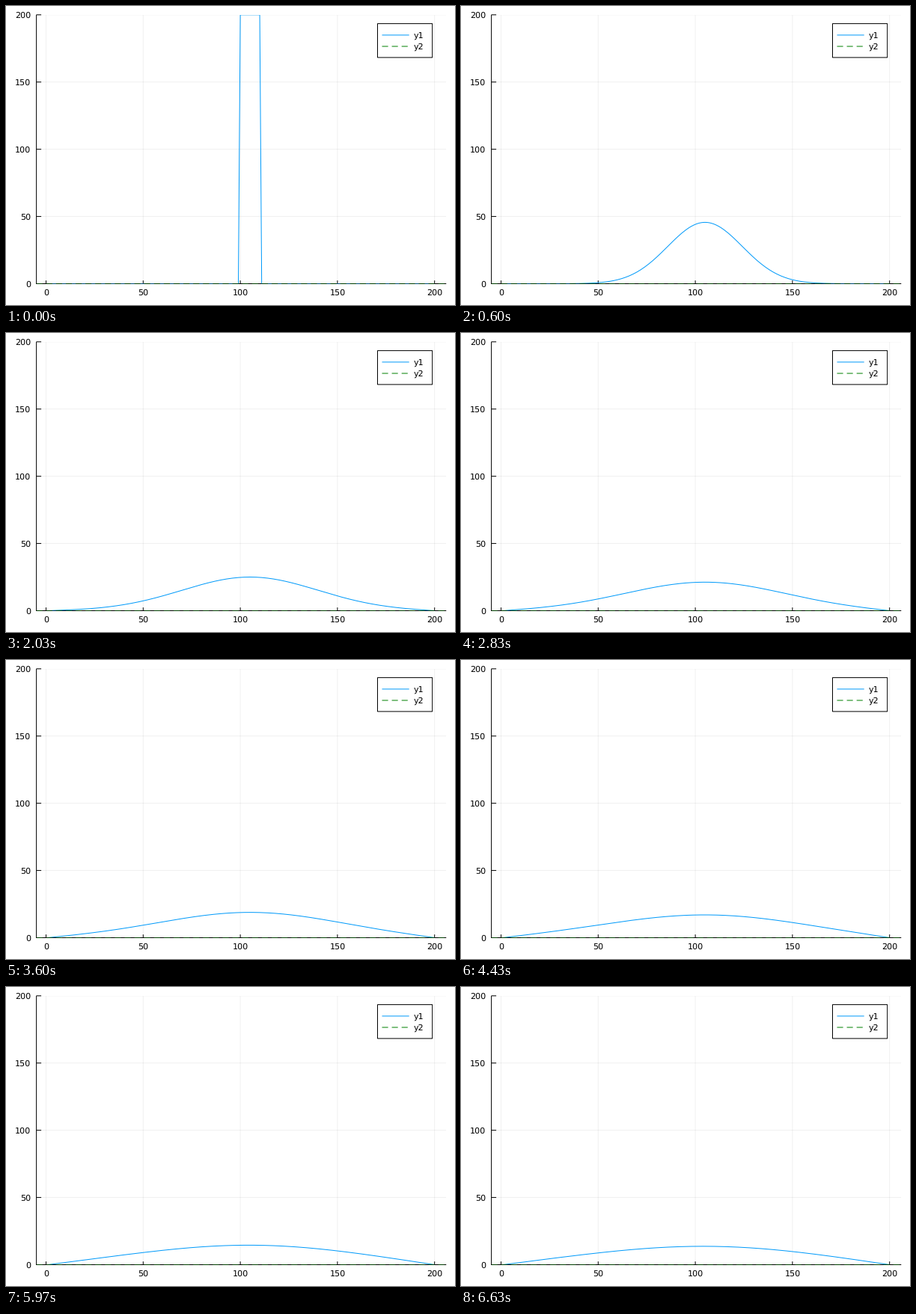
These frames come from a looping animation (600x400 px, 6660 ms). A matplotlib script:

```python
import numpy as np
import matplotlib.pyplot as plt
from matplotlib.animation import FuncAnimation
from matplotlib.patches import Rectangle

W, H, DPI = 600, 400, 100
PX = 72 / DPI                       # one pixel in points
LEFT, RIGHT, TOP, BOTTOM = 40.6, 588.2, 11.8, 371.5
BLUE, GREEN = "#009AFA", "green"
DASH = (0, (8.1, 5))
TICK_MS, LOOP_MS, STEPS = 10, 6660, 200
N, RATE = 200, 10.0                 # cells, diffusion per step

plt.rcParams.update({"font.family": "DejaVu Sans", "font.size": 8,
                     "text.hinting": "none"})

# Heat equation with ends held at zero, solved by sine modes
cell = np.arange(1, N + 1)
start = np.where((cell >= 100) & (cell <= 110), 200.0, 0.0)
mode = np.arange(1, N - 1)
basis = np.sin(np.pi * np.outer(cell - 1, mode) / (N - 1))
coef = 2 / (N - 1) * basis.T @ start
decay = 4 * RATE * np.sin(np.pi * mode / (2 * (N - 1))) ** 2


def heat(step):
    return basis @ (coef * np.exp(-decay * step))


def to_x(v):
    pad = 0.03 * (N - 1)
    return LEFT + (v - 1 + pad) * (RIGHT - LEFT) / (N - 1 + 2 * pad)


def to_y(v):
    return BOTTOM - v * (BOTTOM - TOP) / 200


# The whole stage in pixels, y downwards
fig = plt.figure(figsize=(W / DPI, H / DPI), dpi=DPI, facecolor="white")
ax = fig.add_axes([0, 0, 1, 1])
ax.set_xlim(0, W)
ax.set_ylim(H, 0)
ax.axis("off")
inside = Rectangle((LEFT, BOTTOM + 0.5), RIGHT - LEFT, TOP - BOTTOM - 0.5,
                   transform=ax.transData)


def line(xs, ys, color="black", clip=False, **style):
    artist, = ax.plot(xs, ys, color=color, linewidth=PX, snap=False,
                      solid_capstyle="butt", dash_capstyle="butt", **style)
    if clip:
        artist.set_clip_path(inside)
    return artist


for v in range(0, 201, 50):
    x, y = to_x(v), to_y(v)
    line([x, x], [TOP, BOTTOM], alpha=0.06, clip=True, zorder=1)
    line([LEFT, RIGHT], [y, y], alpha=0.06, clip=True, zorder=1)
    line([x, x], [BOTTOM, BOTTOM - 4.3])
    line([LEFT, LEFT + 6.5], [y, y])
    ax.text(x, 387, v, ha="center", va="baseline")
    ax.text(33.2, y + 4.1, v, ha="right", va="baseline")

line([LEFT, LEFT], [TOP, BOTTOM + 0.5])
line([LEFT, RIGHT], [BOTTOM, BOTTOM])
curve = line(to_x(cell), to_y(start), BLUE, clip=True, zorder=3)
line([LEFT, RIGHT], [BOTTOM, BOTTOM], GREEN, clip=True, linestyle=DASH, zorder=3)
# series lying on the axis only tint it
line([LEFT, RIGHT], [BOTTOM, BOTTOM], alpha=0.5, zorder=4)

ax.add_patch(Rectangle((496.5, 23.6), 73.2, 45.3, facecolor="white",
                       edgecolor="black", linewidth=PX, snap=False, zorder=5))
for y, label, color, dash in ((38.9, "y1", BLUE, "-"), (54, "y2", GREEN, DASH)):
    line([502.5, 538.7], [y, y], color, linestyle=dash, zorder=6)
    ax.text(544.6, y + 4.1, label, va="baseline", zorder=6)


def update(i):
    # steps last a third of 100 ms, rounded to whole ticks
    step = int((i + 0.5) * TICK_MS * 0.03)
    curve.set_ydata(to_y(heat(min(step, STEPS - 1))))
    return curve,


anim = FuncAnimation(fig, update, frames=LOOP_MS // TICK_MS, interval=TICK_MS,
                     repeat=True, repeat_delay=0, blit=False)
plt.show()
```
